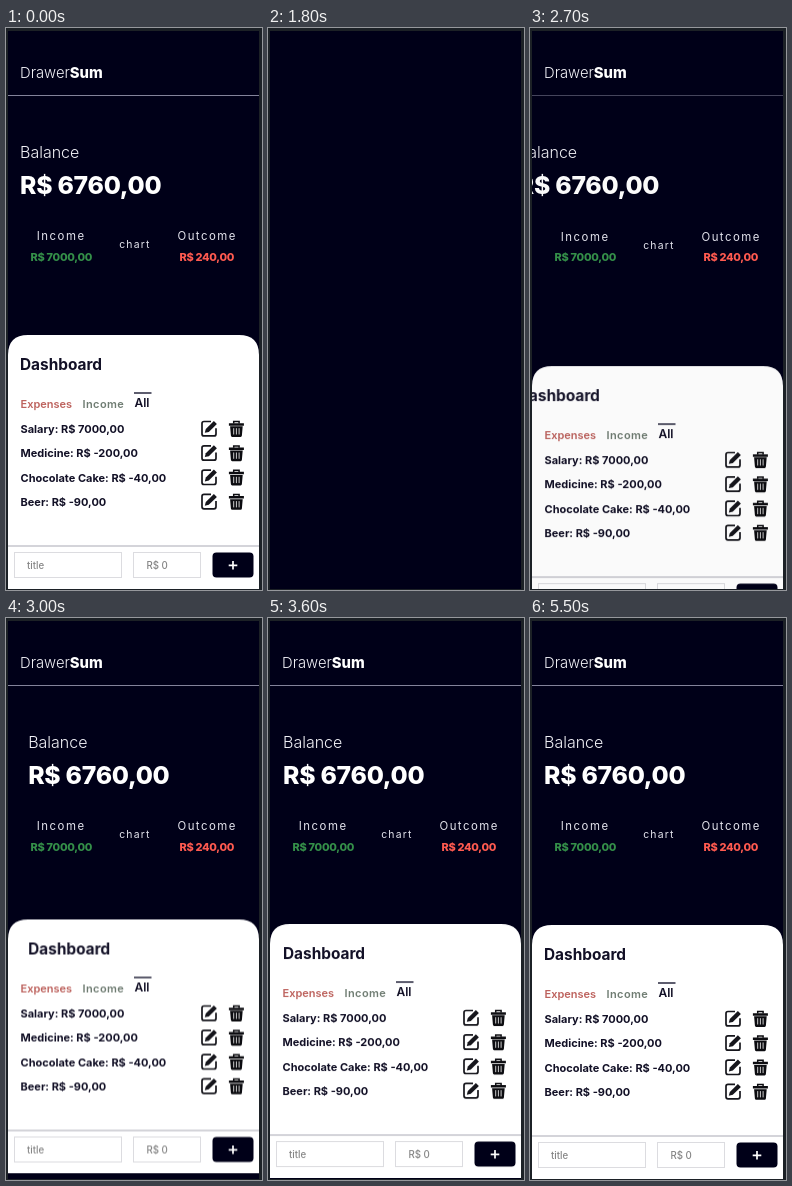
An HTML page that plays this animation: 256x562 px, repeating every 7.1 s.

```html
<!DOCTYPE html>
<html lang="en">
<head>
<meta charset="utf-8">
<title>Budget dashboard</title>
<style>
  html, body { margin: 0; width: 100%; height: 100%; overflow: hidden; background: #1c2126; }
  svg { display: block; width: 100vw; height: 100vh; font-family: Inter, "Open Sans", sans-serif; }

  .drop, .rise, .slide {
    animation: 1.92s cubic-bezier(.215, .61, .355, 1) both paused;
    animation-delay: calc(1794ms - var(--t, 7100ms));
  }
  .drop { animation-name: drop; animation-duration: 1s; animation-delay: calc(1745ms - var(--t, 7100ms)); }
  .rise { animation-name: rise; }
  .slide { animation-name: slide; }

  @keyframes drop {
    0% { opacity: 0; transform: translateY(-3000px); }
    60% { opacity: 1; transform: translateY(25px); }
    75% { transform: translateY(-10px); }
    90% { transform: translateY(5px); }
    100% { transform: none; }
  }
  @keyframes rise {
    0% { opacity: 0; transform: translateY(3000px); }
    60% { opacity: 1; transform: translateY(-20px); }
    75% { transform: translateY(10px); }
    90% { transform: translateY(-5px); }
    100% { transform: none; }
  }
  @keyframes slide {
    0% { opacity: 0; transform: translateX(-3000px); }
    60% { opacity: 1; transform: translateX(25px); }
    75% { transform: translateX(-10px); }
    90% { transform: translateX(5px); }
    100% { transform: none; }
  }

  .light { fill: #f2f2f8; font-weight: 300; }
  .bold { font-weight: 800; fill: #fff; }
  .label { fill: #e4e4ee; font-size: 11.4px; letter-spacing: 1.5px; }
  .small { font-size: 10.4px; letter-spacing: 1.2px; }
  .sum { font-size: 11px; font-weight: 800; letter-spacing: -.3px; }
  .mid { text-anchor: middle; }
  .panel { fill: #121026; font-size: 11px; font-weight: 600; }
  .strong { font-weight: 700; }
  .hint { fill: #858585; font-size: 9.7px; font-weight: 500; }
  .field { fill: #fff; stroke: #dcdce0; }
</style>
</head>
<body>
<svg viewBox="0 0 256 562" preserveAspectRatio="none">
  <defs>
    <clipPath id="screen"><rect x="2" y="3" width="251" height="558"/></clipPath>
    <g id="edit">
      <path d="M10 1.3H3Q1 1.3 1 3.3V13.7Q1 15.7 3 15.7H13Q15 15.7 15 13.7V8" fill="none" stroke="#16161c" stroke-width="1.7"/>
      <path d="M3.8 12.6L4.8 8.8L12.9 .8L15.9 3.8L7.8 11.7Z" fill="#16161c"/>
    </g>
    <g id="bin">
      <path d="M5 3V1.1H10.4V3" fill="none" stroke="#0c0c10" stroke-width="1.5"/>
      <path d="M.2 2.7H15.2V5.2H.2ZM1.4 5.8H14L13.2 15Q13.1 16.4 11.9 16.4H3.5Q2.3 16.4 2.2 15Z" fill="#0c0c10"/>
      <path d="M5 7.7V14M7.7 7.7V14M10.4 7.7V14" stroke="#fff" stroke-width=".8"/>
    </g>
  </defs>

  <g clip-path="url(#screen)">
    <rect width="256" height="562" fill="#000018"/>

    <g class="drop">
      <text class="light" x="14" y="49.5" font-size="14.8">Drawer<tspan class="bold">Sum</tspan></text>
      <path d="M2 67.5H253" stroke="#83839a"/>
    </g>

    <g class="slide">
      <text class="light" x="14" y="129.5" font-size="16">Balance</text>
      <text class="bold" x="14" y="166" font-size="24.8" letter-spacing="-.25">R$ 6760,00</text>
    </g>

    <g class="drop mid">
      <text class="label" x="55.2" y="212.3">Income</text>
      <text class="sum" x="55.3" y="233" fill="#348f49">R$ 7000,00</text>
      <text class="label small" x="128.9" y="220.2">chart</text>
      <text class="label" x="201.2" y="212.3">Outcome</text>
      <text class="sum" x="200.8" y="233" fill="#ff5a50">R$ 240,00</text>
    </g>

    <g class="rise panel">
      <path d="M2 561V327Q2 307 22 307H233Q253 307 253 327V561Z" fill="#fff"/>
      <text class="slide strong" x="14" y="341.5" font-size="15.4">Dashboard</text>

      <text x="14.5" y="380" fill="#bd625d">Expenses</text>
      <text x="76.5" y="380" fill="#6f7c72" letter-spacing=".4">Income</text>
      <path d="M128 365H145.5" stroke="#34344a" stroke-width="1.6"/>
      <text x="128.5" y="378.5" font-size="12">All</text>

      <g id="rows" class="strong"></g>

      <path d="M2 518H253" stroke="#a9a9b4"/>
      <rect class="field" x="8.5" y="524.5" width="107" height="25"/>
      <text class="hint" x="21" y="540.5">title</text>
      <rect class="field" x="127.5" y="524.5" width="67" height="25"/>
      <text class="hint" x="140.5" y="540.5">R$ 0</text>
      <rect x="206.5" y="524.5" width="41" height="25" rx="4" fill="#000018"/>
      <path d="M222.7 537.3H231.3M227 533V541.6" stroke="#fff" stroke-width="1.7"/>
    </g>
  </g>
</svg>
<script>
  const LOOP = 7100, RELOAD = 1800, STEP = 100;

  const items = ["Salary: R$ 7000,00", "Medicine: R$ -200,00", "Chocolate Cake: R$ -40,00", "Beer: R$ -90,00"];
  document.getElementById("rows").innerHTML = items.map((item, i) => {
    const y = 401 + i * 24.3;
    return `<text x="14.5" y="${y + 4}">${item}</text>
      <use href="#edit" x="195" y="${y - 8.8}"/><use href="#bin" x="222.7" y="${y - 8.5}"/>`;
  }).join("");

  // The screen is settled until the reload, then every part bounces in.
  function draw(now) {
    const t = Math.floor(now % LOOP / STEP) * STEP;
    const clock = t < RELOAD ? t + LOOP : t;
    document.documentElement.style.setProperty("--t", clock + "ms");
    requestAnimationFrame(draw);
  }
  draw(performance.now());
</script>
</body>
</html>
```
